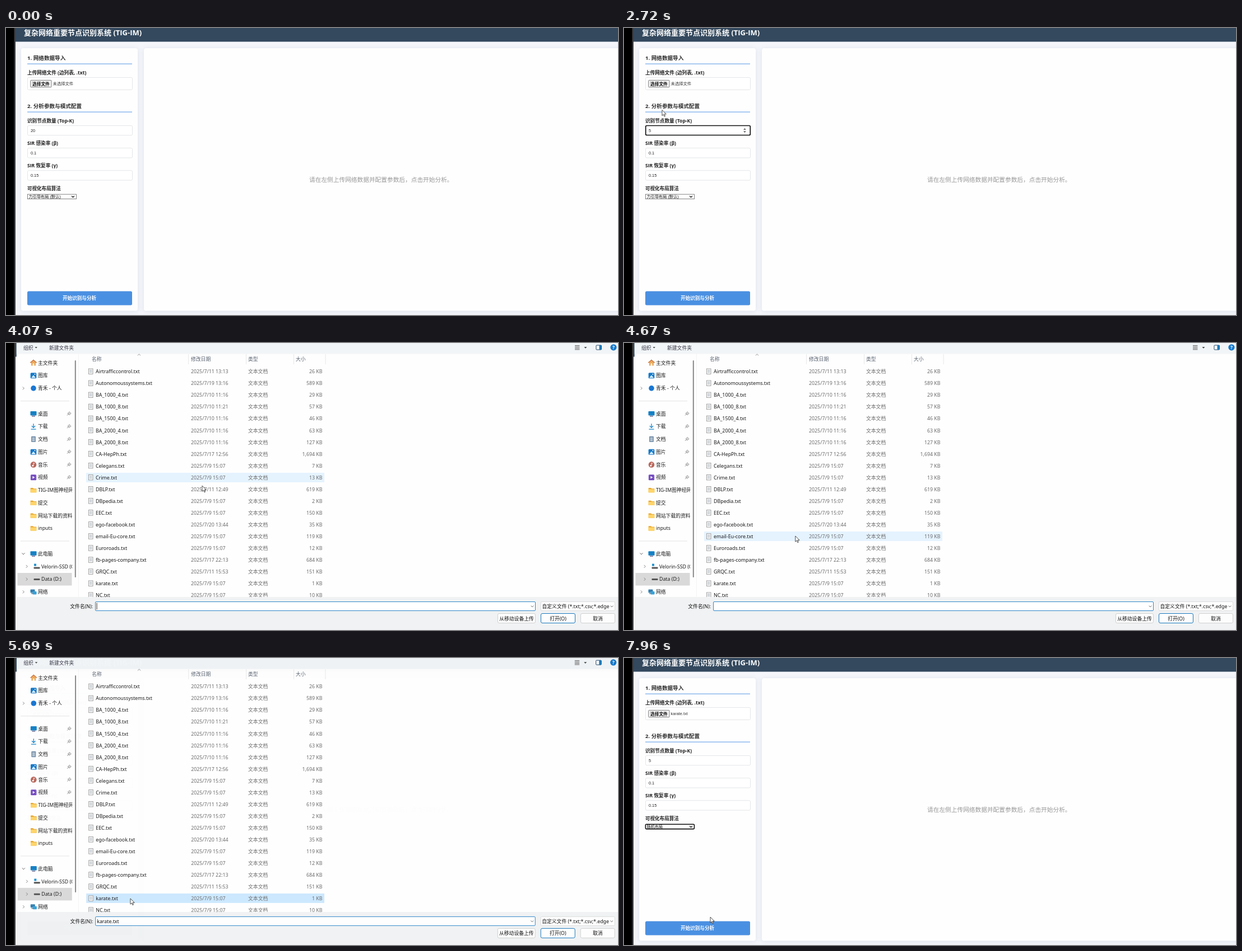
Write an HTML page that moves like this. It is 1092 by 513 pixels and loops after 8 s.

```html
<!DOCTYPE html>
<html lang="zh-CN">
<head>
<meta charset="utf-8">
<style>
html, body { margin: 0; width: 100%; height: 100%; overflow: hidden; background: #000; }
svg { display: block; width: 1092px; height: 513px; }
text { font-family: "Open Sans", "Noto Sans CJK SC", "Noto Sans CJK", sans-serif; white-space: pre; }
#dialog text, #skeleton text { font-family: "Noto Sans", "Noto Sans CJK SC", "Noto Sans CJK", sans-serif; }
.arial { font-family: "Liberation Sans", "Noto Sans CJK SC", "Noto Sans CJK", sans-serif; }
.card { filter: drop-shadow(0 1px 4px rgba(60, 70, 110, .12)); }
</style>
</head>
<body>
<svg id="stage" viewBox="0 0 1092 513"></svg>
<script>
const LOOP = 8000, ROW = 21.05, NAV = 22.75;

// Drawing helpers return SVG markup; text is centred on y.
const rect = (x, y, w, h, fill, extra = '') =>
  `<rect x="${x}" y="${y}" width="${w}" height="${h}" fill="${fill}" ${extra}/>`;
const path = (d, stroke, width = 1, fill = 'none', extra = '') =>
  `<path d="${d}" stroke="${stroke}" stroke-width="${width}" fill="${fill}" ${extra}/>`;
const circle = (x, y, r, fill, extra = '') => `<circle cx="${x}" cy="${y}" r="${r}" fill="${fill}" ${extra}/>`;
const text = (x, y, s, size = 8.8, fill = '#1b1b1b', extra = '') =>
  `<text x="${x}" y="${(y + size * .37).toFixed(2)}" font-size="${size}" fill="${fill}" ${extra}>${s}</text>`;
const group = (id, body, extra = '') => `<g id="${id}" ${extra}>${body}</g>`;
const down = (x, y, r = 2.6, color = '#555', w = .9) => path(`M${x - r} ${y - r / 2}l${r} ${r}l${r} ${-r}`, color, w);
const right = (x, y) => path(`M${x - 1.2} ${y - 2.5}l2.5 2.5l-2.5 2.5`, '#777', .9);
const BOLD = 'font-weight="700"', ARIAL = 'class="arial"';
const MID = 'text-anchor="middle"', END = 'text-anchor="end"';

const FIELDS = [
  { y: 174.5, label: '识别节点数量 (Top-K)', value: '20' },
  { y: 214.7, label: 'SIR 感染率 (β)', value: '0.1' },
  { y: 254.8, label: 'SIR 恢复率 (γ)', value: '0.15' }
];
const LAYOUTS = ['力引导布局 (默认)', '环形布局', '随机布局'];

function field({ y, label, value }, i) {
  const spin = path(`M213 ${y + 7.6}l2.4 -3l2.4 3zM213 ${y + 9.8}l2.4 3l2.4 -3z`, 'none', 0, '#666');
  return text(38, y - 8.6, label, 8.6, '#222', BOLD) +
    rect(38.5, y, 187, 17.3, '#fff', 'rx="2" stroke="#e4e6e8"') +
    (i ? '' : rect(38.7, y, 186.6, 17, '#fff', 'id="focus" rx="2" stroke="#111" stroke-width="1.7"') +
      rect(43.5, y + 4, 9, 10, '#1a73e8', 'id="selection"')) +
    text(44, y + 8.7, value, 7.3, '#222', `${ARIAL} id="value${i}"`) + group('spin' + i, spin);
}

function page() {
  const heading = (y, s) => text(38, y, s, 9.6, '#2b2b2b', BOLD) + rect(38, y + 10.4, 187, 1.6, '#94bdee');
  return rect(17, 0, 1075, 520, '#f4f6fb', 'rx="5"') + rect(17, 0, 1075, 24.5, '#34495e') +
    text(32, 8.5, '复杂网络重要节点识别系统 (TIG-IM)', 13, '#fff', BOLD) +
    rect(27, 36, 208, 469.5, '#fefefe', 'rx="4" class="card"') +
    rect(246, 36, 860, 469.5, '#fefefe', 'rx="4" class="card"') +
    heading(53, '1. 网络数据导入') +
    text(38, 80, '上传网络文件 (边列表, .txt)', 8.65, '#222', BOLD) +
    rect(38.5, 88.5, 187, 22, '#fff', 'rx="2" stroke="#e4e6e8"') +
    rect(43.7, 93.4, 37.4, 12.4, '#efefef', 'rx="1" stroke="#767676" stroke-width=".9"') +
    text(47, 99.7, '选择文件', 7.7, '#111', BOLD) +
    text(83.6, 99.7, '未选择文件', 7.3, '#333', `${ARIAL} id="chosen"`) +
    heading(139, '2. 分析参数与模式配置') + FIELDS.map(field).join('') +
    text(38, 286.5, '可视化布局算法', 8.55, '#222', BOLD) +
    rect(38.4, 297.2, 87, 8.4, '#fff', 'id="select" stroke="#666" stroke-width=".8"') +
    text(40.5, 301.3, LAYOUTS[0], 7.2, '#111', `${ARIAL} id="layout"`) + down(119.5, 301.4, 2.3, '#111', 1.2) +
    rect(38, 470.5, 187, 25, '#4a90e2', 'rx="2.5"') +
    text(131, 483.2, '开始识别与分析', 8.6, '#fff', `${BOLD} ${MID}`) +
    text(541, 271, '请在左侧上传网络数据并配置参数后，点击开始分析。', 10.7, '#999') +
    group('menu', rect(38.4, 306, 87, 32, '#fff', 'stroke="#777" stroke-width=".8"') +
      rect(39, 306.7, 86, 10.2, '#1967d2', 'id="option"') +
      LAYOUTS.map((s, i) => text(40.5, 311.8 + i * 10.3, s, 7.2, '#111', `${ARIAL} id="option${i}"`)).join(''));
}

const FILES = `Airtrafficcontrol|11 13:13|26
Autonomoussystems|19 13:16|589
BA_1000_4|10 11:16|29
BA_1000_8|10 11:21|57
BA_1500_4|10 11:16|46
BA_2000_4|10 11:16|63
BA_2000_8|10 11:16|127
CA-HepPh|17 12:56|1,694
Celegans||7
Crime||13
DBLP|11 12:49|619
DBpedia||2
EEC||150
ego-facebook|20 13:44|35
email-Eu-core||119
Euroroads||12
fb-pages-company|17 22:13|684
GRQC|11 15:53|151
karate||1
NC||10`.split('\n').map(line => line.split('|'));

// Icons are centred on the origin.
const screen = rect(-5.5, -4.5, 11, 7.5, '#1580c4', 'rx="1"') + rect(-3, 3.8, 6, 1.2, '#447');
const picture = rect(-5.3, -5, 10.6, 10, '#1479c9', 'rx="1.5"') + path('M-4 4L0 -1L4 4z', 'none', 0, '#d8f0ff') + circle(2.5, -2.3, 1, '#fff');
const drive = rect(-5.5, -1.2, 11, 3, '#555', 'rx="1"');
const ICONS = {
  home: path('M-5.5 0L0 -5L5.5 0', '#c96b2c', 1.5) + path('M-4 -.5L0 -4L4 -.5V5H1.3V1.2H-1.3V5H-4z', 'none', 0, '#eba85a'),
  picture, screen, drive,
  dot: circle(0, 0, 4.8, '#1976d2'),
  down: path('M0 -5V2M-3.2 -1L0 2.2L3.2 -1M-4.5 5H4.5', '#1784c7', 1.3),
  doc: rect(-4, -5.2, 8, 10.4, '#7c95ad', 'rx="1"') + path('M-2.3 -2H2.3M-2.3 .3H2.3M-2.3 2.6H2.3', '#fff', .9),
  music: circle(0, 0, 5.3, '#b9685c') + circle(-1.2, 2, 1.4, '#fff') + path('M0 2V-3L2.4 -2', '#fff', .9),
  video: rect(-5.2, -5, 10.4, 10, '#7046bd', 'rx="1.5"') + path('M-1.6 -2.5L2.4 0L-1.6 2.5z', 'none', 0, '#fff') + path('M-4.2 -4V4M4.2 -4V4', '#c9b3f0', .8, 'none', 'stroke-dasharray="1 1"'),
  folder: path('M-5.3 -4H-1L.5 -2.6H5.3V4.4H-5.3z', 'none', 0, '#e7a72f') + rect(-5.3, -1.6, 10.6, 6, '#ffd568', 'rx=".8"'),
  system: rect(-5, -4.8, 4, 4, '#1f93d1') + rect(-5.5, 1, 11, 3, '#555', 'rx="1"'),
  net: rect(-5.5, -4.5, 8, 6, '#357fae', 'rx="1"') + rect(-1.5, -1, 7, 5.5, '#36a2d9', 'rx="1"') + rect(-4, 2.5, 3, 1, '#456')
};
const PLACES = [
  ['home', '主文件夹'], ['picture', '图库'], ['dot', '青禾 - 个人', 1], null,
  ['screen', '桌面'], ['down', '下载'], ['doc', '文档'], ['picture', '图片'], ['music', '音乐'], ['video', '视频'],
  ['folder', 'TIG-IM图神经网络'], ['folder', '提交'], ['folder', '网站下载的资料'], ['folder', 'inputs'], null,
  ['screen', '此电脑', 2], ['system', 'Velorin-SSD (C:)', 3], ['drive', 'Data (D:)', 3], ['net', '网络', 1]
];

function place(entry, i) {
  const y = 35.4 + NAV * i;
  if (!entry) return rect(26, y - .3, 87, .8, '#ddd');
  const [icon, name, level] = entry, shift = level === 3 ? 6 : 0;
  return `<g transform="translate(${49 + shift} ${y})">${ICONS[icon]}</g>` + text(57 + shift, y, name) +
    (level === 2 ? down(31, y) : level ? right(31 + shift, y) : '') +
    (i > 3 && i < 10 ? path(`M109 ${y + 3}l2 -2m-1 -2l3.5 3.5m-2 -4.5l3 3l1.3 -1.7l-2.6 -2.6zm-1.5 1l3 3`, '#777', .9) : '');
}

function fileRow([name, when, size], i) {
  const y = 51 + ROW * i, grey = '#6b6b6b';
  return rect(147.5, y - 5, 7.5, 9.5, '#fafafa', 'stroke="#8d8d8d" stroke-width=".8"') +
    path(`M149 ${y - 2.5}h4.5m-4.5 2h4.5m-4.5 2h4.5`, '#8b9aa5', .7) +
    text(160, y, name + '.txt', 8.85) + text(330, y, '2025/7/' + (when || '9 15:07'), 8.8, grey) +
    text(432, y, '文本文档', 8.8, grey) + text(564.5, y, size + ' KB', 8.8, grey, END);
}

function dialog() {
  const heads = [[153, '名称'], [330, '修改日期'], [432, '类型'], [517, '大小']];
  const button = (x, w, s, stroke = '#d0d0d0') =>
    rect(x, 483.5, w, 17, '#fdfdfd', `rx="2.5" stroke="${stroke}"`) + text(x + w / 2, 492.3, s, 8.8, '#111', MID);
  const box = (x, w, stroke) => rect(x, 462.5, w, 16, '#fff', `rx="1.5" stroke="${stroke}"`);
  return rect(18.8, 0, 1082, 513, '#fefefe') + rect(18.8, 0, 1082, 19.5, '#f2f5f7') +
    text(31, 8.3, '组织', 8.8, '#334') + path('M51.5 7h4.4l-2.2 2.6z', 'none', 0, '#444') + text(77, 8.3, '新建文件夹', 8.8, '#334') +
    path('M1015 4.5h8.5m-8.5 2.4h8.5m-8.5 2.4h8.5m-8.5 2.4h8.5', '#444', .9) + path('M1031.5 7h5l-2.5 2.8z', 'none', 0, '#444') +
    rect(1053, 4, 9.5, 8, '#fff', 'stroke="#246" rx="1"') + rect(1058.5, 4, 4, 8, '#1a7bbd') +
    circle(1084, 7.8, 5.6, '#1479cc') + text(1084, 7.8, '?', 8.5, '#fff', `${MID} ${BOLD}`) +
    rect(20.5, 411, 97, 22.5, '#d9d9d9') + rect(122.8, 31, 2, 388, '#888', 'rx="1"') + rect(129, 19.5, .8, 435, '#f0f0f0') +
    group('places', PLACES.map(place).join(''), 'clip-path="url(#nav)"') +
    heads.map(([x, s]) => text(x, 28.8, s, 8.8, '#596270')).join('') +
    path('M325.5 20V38M428.5 20V38M513.5 20V38M570 20V38', '#e6e6e6', .9) + path('M234.8 22.3l2.6 -2.4l2.6 2.4', '#777', .8) +
    rect(143, 0, 425, 17, '#e5f3ff', 'id="hover"') + FILES.map(fileRow).join('') +
    rect(18.8, 454, 1082, 59, '#f0f2f3') + text(155, 470.5, '文件名(N):', 8.8, '#111', END) +
    box(159.5, 785, '#2f86c8') + down(939, 470.7, 2.3) + rect(161.6, 464.5, .9, 12, '#111', 'id="caret"') +
    text(162, 470.6, '', 8.8, '#111', 'id="name"') +
    box(954.5, 132, '#dcdcdc') + text(956.5, 470.6, '自定义文件 (*.txt;*.csv;*.edge', 8.8, '#111') + down(1081, 470.7, 2.3) +
    button(877.5, 67, '从移动设备上传') + button(954.5, 61, '打开(O)', '#1878bd') + button(1025.5, 61, '取消');
}

// The dialog's first, half-painted appearance.
function skeleton() {
  return rect(51, 0, 1018, 496, '#eff1f1') + rect(51, 0, 446, 312, '#fefefe') + rect(51, 0, 1018, 11, '#f6f7f7') +
    rect(497, -4, 423.5, 9, '#fdfdfd', 'stroke="#bbb" stroke-width=".8"') + rect(927, -4, 136, 9, '#fdfdfd', 'stroke="#bbb" stroke-width=".8"') +
    rect(191, 312, 70, 9, '#fff') + rect(267, 312, 74, 10.5, '#fff') + path('M341 286H267.5V300.3H341', '#1f86d0', 1, '#fff') +
    rect(269.5, 288, .9, 10, '#000') + rect(183, 449, 740, 15, '#fff') + rect(1058, 312, .8, 118, '#fafafa') +
    rect(1062, 43, 2, 269, '#707070', 'rx="1"') + rect(930.5, 449, 126, 14.5, '#fff', 'stroke="#ddd"') +
    text(933, 456.4, '自定义文件 (*.txt;*.csv;*.edge', 8.3, '#333') + down(1050.5, 456.4, 2.3);
}

const stage = document.getElementById('stage');
stage.innerHTML = '<clipPath id="nav"><rect x="19" y="19" width="99" height="435"/></clipPath>' +
  rect(0, 0, 1092, 513, '#000') + rect(14.5, 0, 2.5, 513, '#3b3d40') + page() +
  group('skeleton', skeleton(), 'opacity=".84"') + group('dialog', dialog()) +
  circle(0, 0, 7.8, '#ffee35', 'id="glow" opacity=".7"') +
  group('arrow', path('M0 0V10.2L2.4 8L4 11.7L5.6 11L4 7.4H7.3Z', '#222', .8, '#fff')) +
  group('beam', path('M-2 -4.5H2M0 -4.5V4.5M-2 4.5H2', '#333', .9));

const el = {};
stage.querySelectorAll('[id]').forEach(node => el[node.id] = node);
const set = (id, attrs) => Object.entries(attrs).forEach(([k, v]) => el[id].setAttribute(k, v));
const show = (id, on) => el[id].style.display = on ? '' : 'none';
const write = (id, s) => { if (el[id].textContent !== s) el[id].textContent = s; };
const within = (t, a, b) => t >= a && t < b;
const ease = (t, start, span) => 1 - (1 - Math.min(1, Math.max(0, (t - start) / span))) ** 2;

// Pointer stops: time, x, y.
const STOPS = [
  [70, 1044, 500], [810, 127, 120], [880, 124, 106], [1180, 105, 253], [1520, 53, 184], [1710, 53, 184],
  [1880, 19, 183], [2080, 20, 122], [2510, 87, 252], [2820, 59, 97], [3860, 59, 97], [4070, 350, 255],
  [4540, 328, 322], [5070, 238, 415], [5280, 222, 430], [5690, 222, 430], [6450, 151, 377],
  [6730, 110, 307], [6800, 113, 302], [7020, 113, 302], [7260, 90, 331], [7420, 90, 331], [7960, 154, 463], [8000, 154, 463]
];
const CLICKS = [[1560, 2000], [2850, 3055], [5420, 5600], [6830, 6990], [7300, 7440]];

function pointer(t) {
  const i = Math.max(1, STOPS.findIndex(stop => stop[0] > t));
  const [t0, x0, y0] = STOPS[i - 1], [t1, x1, y1] = STOPS[i], k = Math.max(0, (t - t0) / (t1 - t0));
  return { x: x0 + (x1 - x0) * k, y: y0 + (y1 - y0) * k };
}

function render(t) {
  const { x, y } = pointer(t), open = within(t, 3750, 5890);
  const focused = within(t, 1580, 2850), dragging = within(t, 1580, 2000);

  let overField = dragging;
  FIELDS.forEach((f, i) => {
    const over = !open && t >= 70 && x > 38 && x < 226 && y > f.y && y < f.y + 17.3;
    overField = overField || over;
    show('spin' + i, over || (!i && focused));
  });
  show('focus', focused);
  show('selection', within(t, 1800, 2300));
  set('value0', { fill: within(t, 1800, 2300) ? '#fff' : '#222' });
  write('value0', t < 2300 ? '20' : '5');
  write('chosen', t < 5690 ? '未选择文件' : 'karate.txt');

  const picked = t >= 7390, active = t >= 6870;
  write('layout', LAYOUTS[picked ? 2 : 0]);
  set('select', { stroke: active ? '#111' : '#666', 'stroke-width': active ? 1.6 : .8, rx: active ? 1.5 : 0 });
  show('menu', active && !picked);
  const option = Math.min(2, Math.max(0, Math.floor((y - 306.7) / 10.3)));
  set('option', { y: 306.7 + option * 10.3 });
  LAYOUTS.forEach((_, i) => set('option' + i, { fill: i === option ? '#fff' : '#111' }));

  show('skeleton', within(t, 3750, 3810));
  show('dialog', open && t >= 3810);
  const grow = ease(t, 3750, 200), fade = ease(t, 5690, 200), off = 1 - grow + fade;
  set('dialog', {
    transform: `translate(${33.3 * off} ${13.5 * off}) scale(${1 - .0585 * off})`,
    opacity: (.84 + .16 * grow) * (1 - fade)
  });
  const row = Math.round((pointer(t - 20).y - 51) / ROW), chosen = t >= 5420;
  set('hover', { y: Math.round(42.5 + ROW * row), fill: chosen ? '#cce8ff' : '#e5f3ff' });
  show('hover', within(t, 4000, 5890) && row >= 0);
  write('name', chosen ? 'karate.txt' : '');
  show('caret', !chosen && (t - 3900 + 1060) % 1060 < 530);

  show('glow', CLICKS.some(([a, b]) => within(t, a, b)));
  set('glow', { cx: x, cy: y });
  show('arrow', t >= 70 && !overField);
  show('beam', t >= 70 && overField);
  ['arrow', 'beam'].forEach(id => set(id, { transform: `translate(${x} ${y})` }));
}

const begin = performance.now();
function tick() {
  render((performance.now() - begin) % LOOP);
  requestAnimationFrame(tick);
}
tick();
</script>
</body>
</html>
```
